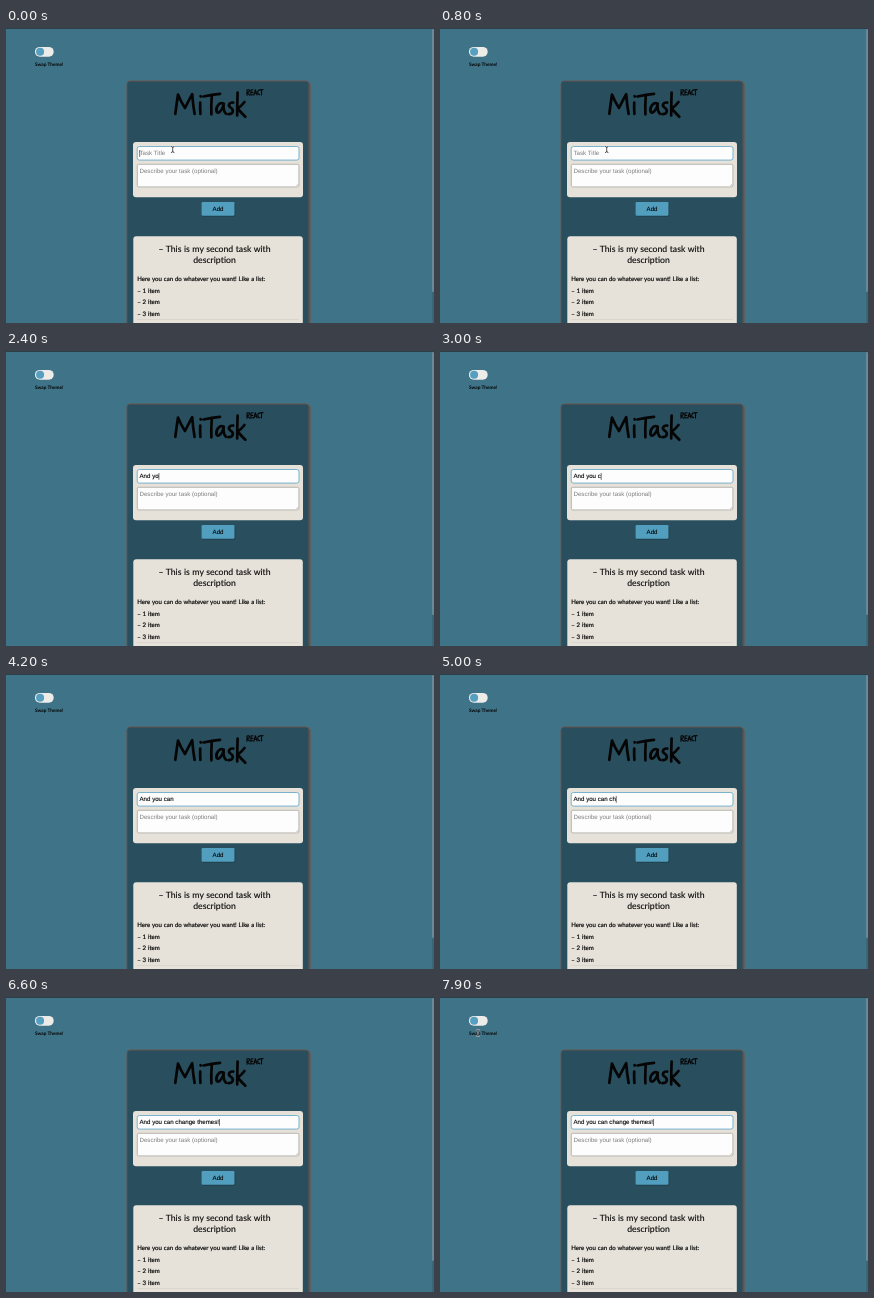
Animation of 428 by 295 pixels, one loop 8000 ms. Source, as an HTML page:

```html
<!DOCTYPE html>
<html lang="en">
<head>
<meta charset="utf-8">
<title>MiTask</title>
<style>
  html, body { margin: 0; width: 100%; height: 100%; overflow: hidden; background: #3f7388; }
  svg { display: block; width: 428px; height: 295px; }
  text { white-space: pre; text-rendering: geometricPrecision; }
  .ui { font: 6.15px "Liberation Sans", Arial, sans-serif; stroke: #111; stroke-width: .12; }
  .hint { fill: #7c7c7c; stroke: none; }
  .hand { font: 6.1px Lato, sans-serif; word-spacing: .3px; stroke: #111; stroke-width: .2; }
  .head { font-size: 8.7px; text-anchor: middle; stroke-width: .12; }
  .label { font: bold 4.75px Lato, sans-serif; }
  .ink { fill: none; stroke: #050505; stroke-linecap: round; stroke-linejoin: round; }
</style>
</head>
<body>
<svg viewBox="0 0 428 295">
  <rect width="428" height="295" fill="#3f7388"/>
  <rect width="428" height="1" fill="#2c3f48"/>
  <rect x="426" y="1" width="2" height="294" fill="#396678"/>
  <rect x="426.3" y="1" width="1.4" height="263" rx=".7" fill="#7d9aa6"/>

  <rect x="28.9" y="18.9" width="18.8" height="9.8" rx="4.9" fill="#eeece8"/>
  <circle cx="34.1" cy="23.8" r="4" fill="#569fc0"/>
  <text class="label" x="29" y="37.6">Swap Theme!</text>

  <rect x="122.5" y="54" width="182" height="260" rx="3" fill="#7a4b39"/>
  <rect x="121" y="53" width="182" height="260" rx="3" fill="#294e5e" stroke="#6d5147" stroke-width=".9"/>

  <g class="ink" role="img" aria-label="MiTask">
    <path stroke-width="2.7" d="M169.3 85.8 Q170.6 76 172 66.5 Q175 74 179 80 Q182.5 73 186.2 66.2 Q187 77 188.6 86
      M194.2 74.5 Q194 81 194.4 85.8 M194.6 68.2 l.2 .3
      M197.5 68.5 Q206 66.6 214 65.8 M205.8 67.5 Q205 78 205.4 86.3
      M217.8 75.8 C213.5 73.5 209.5 79 210.5 83.5 C212 87 216.5 82 217.6 76.8 Q217.2 83 220 85.8
      M227.3 74.6 C223.5 74 221.5 77.5 224.3 79.3 C228 81.5 227.8 86 222.5 86.2
      M231.6 64.5 Q231.2 77 231.2 87.5 M238.5 74 Q235 78.5 231.6 80.5 Q235.5 85 239.3 88.8"/>
  </g>
  <g class="ink" role="img" aria-label="React">
    <path stroke-width="1.1" d="M241 67.2 L241 62 C244.2 60.9 244.3 64 241.2 64.8 L243.7 67.1
      M247 61.8 L244.9 62 L244.9 67 L247.2 66.8 M245 64.4 H246.8
      M247.9 67 L249.4 61.7 L251 66.9 M248.5 65.2 H250.4
      M253.6 62.2 C251.4 61.6 250.9 66.8 253.7 66.6
      M253.8 61.9 L257 61.6 M255.5 61.9 V67"/>
  </g>

  <rect x="127" y="114" width="170" height="55.3" rx="3" fill="#e6e2d9"/>
  <rect x="131.2" y="118.5" width="161.8" height="13.6" rx="2.2" fill="#fdfdfd" stroke="#78b2cd" stroke-width="1"/>
  <rect x="131.3" y="136.3" width="161.6" height="22.6" rx="1.5" fill="#fdfdfd" stroke="#a09c97" stroke-width=".7"/>
  <path d="M290.2 158 l2-2 M291.4 158 l.8-.8" stroke="#888" stroke-width=".4"/>
  <text class="ui hint" x="133.5" y="145">Describe your task (optional)</text>
  <text class="ui" id="field" x="133.5" y="127.4"></text>
  <rect id="caret" y="122" width=".6" height="6.8" fill="#111"/>

  <rect x="196" y="174.8" width="33.2" height="13.8" rx="1.5" fill="#1d3945"/>
  <rect x="195.6" y="174.1" width="32.9" height="13.6" rx="1.2" fill="#519ebf"/>
  <text class="ui" x="212" y="183.1" text-anchor="middle">Add</text>

  <rect x="127.3" y="208.2" width="169.5" height="95" rx="3" fill="#e6e2d9"/>
  <text class="hand head" x="208.5" y="223.6">– This is my second task with</text>
  <text class="hand head" x="208.5" y="235">description</text>
  <text class="hand" x="131.2" y="253">Here you can do whatever you want! Like a list:</text>
  <text class="hand" x="131.2" y="264.6">– 1 item</text>
  <text class="hand" x="131.2" y="276.2">– 2 item</text>
  <text class="hand" x="131.2" y="287.8">– 3 item</text>
  <rect x="131" y="291.2" width="162" height=".6" fill="#d2cec6"/>

  <g id="beam" fill="none" stroke-linecap="round">
    <path d="M-1.3-3 Q0-3 0-2 V2 Q0 3-1.3 3 M1.3-3 Q0-3 0-2 M0 2 Q0 3 1.3 3" stroke="#fff" stroke-opacity=".8" stroke-width="1.5"/>
    <path d="M-1.3-3 Q0-3 0-2 V2 Q0 3-1.3 3 M1.3-3 Q0-3 0-2 M0 2 Q0 3 1.3 3" stroke="#111" stroke-width=".7"/>
  </g>
  <path id="arrow" d="M0 0 V6.6 L1.6 5.2 L2.6 7.4 L3.6 7 L2.6 4.8 L4.7 4.7 Z" fill="#111" stroke="#fff" stroke-width=".5"/>
</svg>
<script>
const LOOP = 8000, BLINK = 500, LEFT = 133.5;
const message = "And you can change themes!";
// one key time per character, in tenths of a second
const keys = [12, 14, 17, 20, 22, 24, 25, 27, 29, 33, 36, 46, 47,
              49, 52, 53, 54, 56, 57, 58, 59, 60, 62, 63, 64, 65].map(k => k * 100);
const start = { x: 166.7, y: 121.5 }, end = { x: 38, y: 36 };
const moveFrom = 7400, moveTime = 450;

const [field, caret, beam, arrow] =
  ["field", "caret", "beam", "arrow"].map(id => document.getElementById(id));

const show = (el, on) => el.setAttribute("visibility", on ? "visible" : "hidden");
const place = (el, x, y) => el.setAttribute("transform", `translate(${x} ${y})`);

function drawField(t) {
  const count = keys.filter(k => k <= t).length;
  field.textContent = (count ? message.slice(0, count) : "Task Title").replace(/ /g, "\u00a0");
  field.setAttribute("class", count ? "ui" : "ui hint");
  const width = count ? field.getComputedTextLength() : 0;
  caret.setAttribute("x", LEFT + width);
  const since = t - (count ? keys[count - 1] : 0);
  show(caret, Math.floor(since / BLINK) % 2 === 0);
}

function drawPointer(t) {
  const p = Math.min(1, Math.max(0, (t - moveFrom) / moveTime));
  const e = p * p * (3 - 2 * p);
  const x = start.x + (end.x - start.x) * e;
  const y = start.y + (end.y - start.y) * e;
  const visible = t < keys[0] || t >= moveFrom;
  const onField = x > 131 && y > 118;
  const onLabel = x < 58 && y < 40;
  const text = onField || onLabel;
  place(beam, x, y);
  place(arrow, x, y);
  show(beam, visible && text);
  show(arrow, visible && !text);
}

function frame(now) {
  const t = now % LOOP;
  drawField(t);
  drawPointer(t);
  requestAnimationFrame(frame);
}
frame(performance.now());
</script>
</body>
</html>
```
